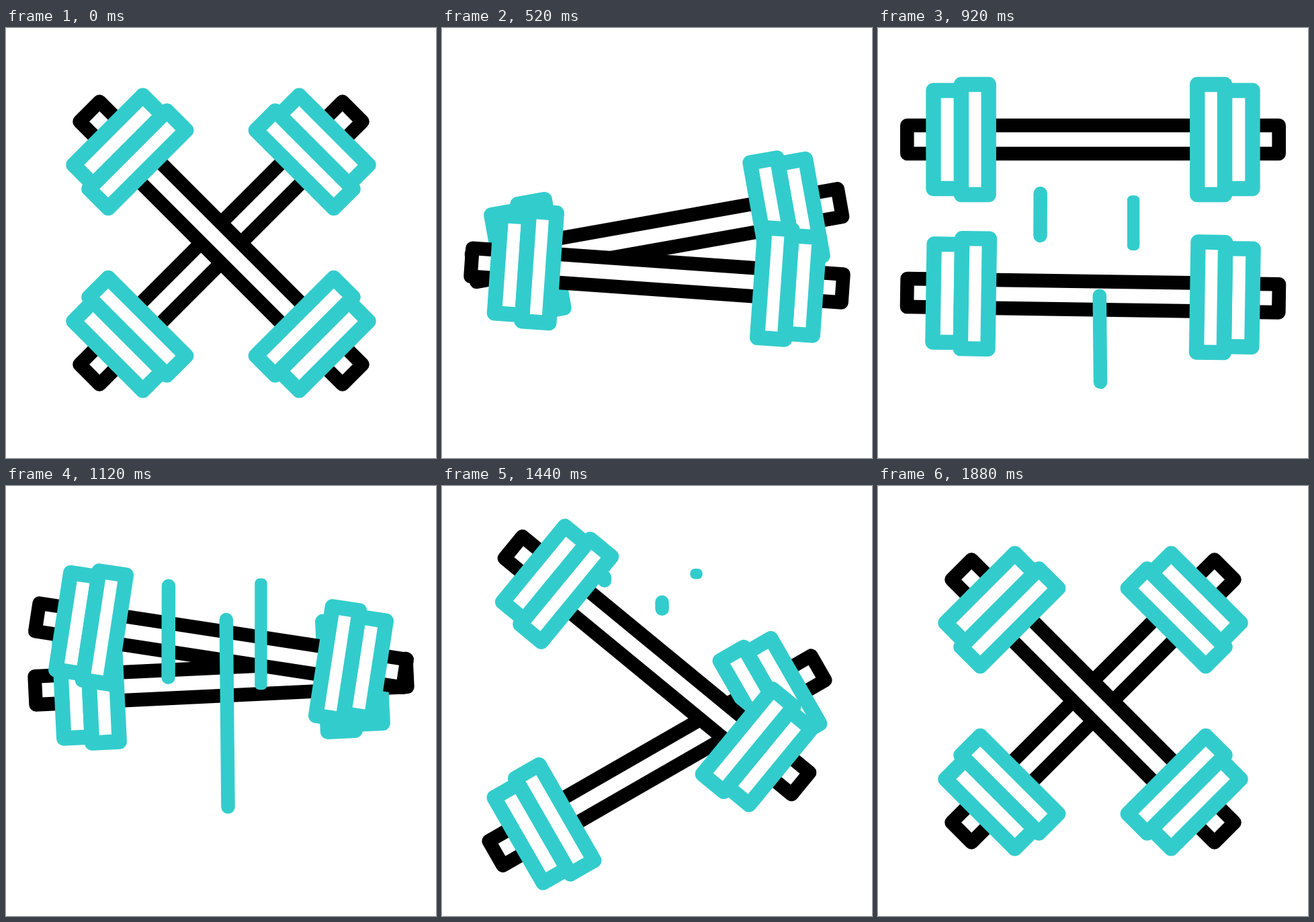
An HTML page with a canvas for the animation above (2440 ms loop, 640 by 640 pixels).

```html
<!DOCTYPE html>
<html>
<head>
<meta charset="utf-8">
<style>
  html, body { margin: 0; width: 100%; height: 100%; overflow: hidden; background: #fff; }
  canvas { display: block; }
</style>
</head>
<body>
<canvas id="stage" width="640" height="640"></canvas>
<script>
const ctx = document.getElementById('stage').getContext('2d');
const LOOP = 2440, STEP = 40, LAG = 120, TEAL = '#33cccc';

// Progress from t0 to t1 along cubic-bezier(a, 0, b, 1); the defaults give smoothstep.
function ease(t, t0, t1, a = 1 / 3, b = 2 / 3) {
  const x = Math.min(1, Math.max(0, (t - t0) / (t1 - t0)));
  if (x === 0 || x === 1) return x;
  let lo = 0, hi = 1;
  for (let i = 0; i < 30; i++) {
    const s = (lo + hi) / 2, r = 1 - s;
    if (3 * a * s * r * r + 3 * b * s * s * r + s * s * s < x) lo = s; else hi = s;
  }
  return lo * lo * (3 - 2 * lo);
}

const mix = (a, b, p) => a + (b - a) * p;

// Tilt in degrees: flatten, then cross again.
const tilt = t => 45 * (1 - ease(t, 0, 800, .4, .2) + ease(t, 800, 1700, .6, .42));

// Vertical offset: out to the first peak, over to the second, back to the middle.
const shift = (t, first, second) =>
  first * ease(t, 320, 800) +
  (second - first) * ease(t, 800, 1209) -
  second * ease(t, 1209, 1655);

function box(x, halfHeight, width, color, lineWidth) {
  ctx.beginPath();
  ctx.rect(x, -halfHeight, width, 2 * halfHeight);
  ctx.fillStyle = '#fff';
  ctx.fill();
  ctx.strokeStyle = color;
  ctx.lineWidth = lineWidth;
  ctx.stroke();
}

function dumbbell(y, degrees) {
  ctx.save();
  ctx.translate(320, 320 + y);
  ctx.rotate(degrees * Math.PI / 180);
  ctx.lineJoin = 'round';
  box(-276.7, 21, 553.4, '#000', 20.6);
  for (const side of [1, -1]) {
    ctx.save();
    ctx.scale(side, 1);
    box(-237.5, 73, 41.5, TEAL, 22.4);
    box(-196, 82, 40.7, TEAL, 22.4);
    ctx.restore();
  }
  ctx.restore();
}

// Speed lines grow upward from their foot, then the foot follows.
function speedLines(t) {
  const head = ease(t, 729, 1198), tail = ease(t, 1007, 1488);
  if (head === 0 || tail === 1) return;
  ctx.strokeStyle = ctx.fillStyle = TEAL;
  ctx.lineWidth = 20.5;
  ctx.lineCap = 'round';
  for (const [x0, y0, x1, y1] of [[241.5, 309, 242, 136], [331, 527, 327.5, 173]]) {
    ctx.beginPath();
    ctx.moveTo(mix(x0, x1, tail), mix(y0, y1, tail));
    ctx.lineTo(mix(x0, x1, head), mix(y0, y1, head));
    ctx.stroke();
  }
  const top = mix(322, 124, head) - 1, bottom = mix(322, 124, tail) + 9;
  ctx.save();
  ctx.translate(mix(380.5, 378.5, (head + tail) / 2), 0);
  ctx.beginPath();
  ctx.roundRect(-9.2, top, 18.4, bottom - top, 7);
  ctx.fill();
  ctx.restore();
}

function draw(now) {
  const t = Math.floor(now % LOOP / STEP) * STEP;
  ctx.clearRect(0, 0, 640, 640);
  dumbbell(shift(t - LAG, -154, 105), -tilt(t - LAG));
  dumbbell(shift(t, 128, -112), tilt(t));
  speedLines(t);
}

let start;
function frame(now) {
  start ??= now;
  draw(now - start);
  requestAnimationFrame(frame);
}
draw(0);
requestAnimationFrame(frame);
</script>
</body>
</html>
```
